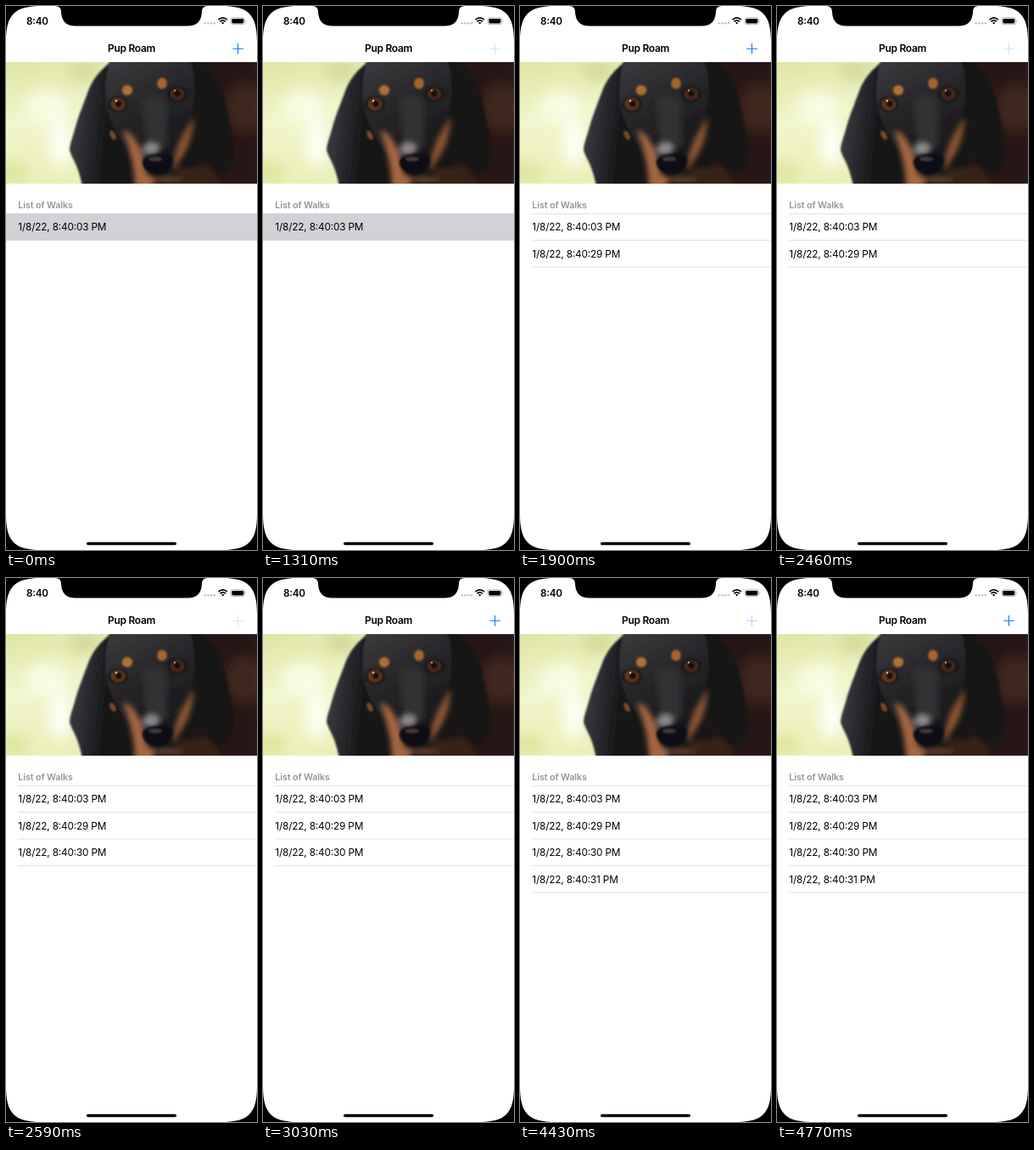
These frames come from a looping animation (296 px wide and 640 px high, 4830 ms). An HTML page:

```html
<!DOCTYPE html>
<html lang="en">
<head>
<meta charset="utf-8">
<title>Walk list</title>
<style>
  html, body { margin: 0; width: 100%; height: 100%; overflow: hidden; background: #fff; }
  svg { display: block; }
  text { font-family: Inter, "Liberation Sans", sans-serif; font-feature-settings: "calt" 1; fill: #000; }
  .clock { font-size: 11.7px; font-weight: 600; letter-spacing: -.25px; }
  .title { font-size: 12px; font-weight: 600; letter-spacing: -.3px; text-anchor: middle; }
  .head { font-size: 10.7px; font-weight: 600; letter-spacing: -.1px; fill: #949498; }
  .row text { font-size: 11.8px; letter-spacing: -.17px; }
  .line { stroke: #e2e2e4; stroke-width: 1; }

  .plus, .picked, .row2, .row3, .row4 { animation: 4830ms step-end infinite; }
  .plus { fill: none; stroke: #007aff; stroke-width: 1.1; animation-name: tap; }
  .picked { animation-name: unpick; }
  .row2 { animation-name: add2; }
  .row3 { animation-name: add3; }
  .row4 { animation-name: add4; }

  /* each tap dims the button at once; it fades back after the row is added */
  @keyframes tap {
    0% { opacity: 1; }
    27.12% { opacity: .2; }
    32.29% { opacity: .32; }
    34.57% { opacity: .6; }
    36.85% { opacity: .87; }
    39.33% { opacity: 1; }
    50.93% { opacity: .2; }
    55.9% { opacity: .32; }
    58.17% { opacity: .6; }
    60.66% { opacity: .9; }
    62.73% { opacity: 1; }
    85.71% { opacity: .2; }
    91.71% { opacity: .32; }
    93.99% { opacity: .6; }
    96.48% { opacity: .87; }
    98.75%, 100% { opacity: 1; }
  }
  @keyframes unpick { 0% { opacity: 1; } 30.02%, 100% { opacity: 0; } }
  @keyframes add2 { 0% { opacity: 0; } 30.02%, 100% { opacity: 1; } }
  @keyframes add3 { 0% { opacity: 0; } 53.62%, 100% { opacity: 1; } }
  @keyframes add4 { 0% { opacity: 0; } 89.44%, 100% { opacity: 1; } }
</style>
</head>
<body>
<svg width="296" height="640" viewBox="0 0 296 640">
  <defs>
    <clipPath id="frame"><path d="M0 66H296V209H0Z"/></clipPath>
    <linearGradient id="meadow" x1="0" y1="0" x2=".35" y2="1">
      <stop offset="0" stop-color="#dfe6a4"/>
      <stop offset=".45" stop-color="#f1f5cc"/>
      <stop offset="1" stop-color="#eaefb6"/>
    </linearGradient>
    <linearGradient id="face" x1="0" y1="0" x2=".4" y2="1">
      <stop offset="0" stop-color="#3d3c40"/>
      <stop offset=".5" stop-color="#262528"/>
      <stop offset="1" stop-color="#171618"/>
    </linearGradient>
    <linearGradient id="ear" x1="0" y1="0" x2="1" y2=".3">
      <stop offset="0" stop-color="#414246"/>
      <stop offset=".5" stop-color="#2b2c30"/>
      <stop offset="1" stop-color="#141416"/>
    </linearGradient>
    <filter id="soft" x="-50%" y="-50%" width="200%" height="200%"><feGaussianBlur stdDeviation="8"/></filter>
    <filter id="mid" x="-50%" y="-50%" width="200%" height="200%"><feGaussianBlur stdDeviation="3"/></filter>
    <filter id="fine" x="-30%" y="-30%" width="160%" height="160%"><feGaussianBlur stdDeviation="1.2"/></filter>
  </defs>

  <rect width="296" height="640" fill="#fff"/>

  <!-- photo -->
  <g clip-path="url(#frame)">
    <rect y="66" width="296" height="143" fill="url(#meadow)"/>
    <g filter="url(#soft)">
      <ellipse cx="92" cy="76" rx="18" ry="12" fill="#d3d99a"/>
      <ellipse cx="48" cy="120" rx="26" ry="20" fill="#f9fbe2"/>
      <ellipse cx="64" cy="162" rx="14" ry="28" fill="#fdfef4"/>
      <ellipse cx="8" cy="196" rx="20" ry="12" fill="#dde59c"/>
      <path d="M205 50H310V225H205Z" fill="#261814"/>
      <ellipse cx="282" cy="120" rx="24" ry="28" fill="#40271f"/>
    </g>
    <g filter="url(#fine)">
      <path d="M216 60C240 68 256 92 262 128C267 155 270 178 262 192C248 200 232 186 222 168Z" fill="#151314"/>
      <path d="M122 64H220C228 90 228 128 222 160L232 212H100L112 130Z" fill="#171618"/>
      <path d="M126 64C112 74 102 86 97 100C91 116 86 128 82 142C79 154 75 162 75 170C78 180 85 186 90 212H118C114 184 128 156 124 120Z" fill="url(#ear)"/>
      <path d="M124 62H216C225 82 224 112 218 132C214 158 206 182 196 194C184 206 166 202 156 186C142 168 126 148 120 124C116 104 116 82 124 62Z" fill="url(#face)"/>
    </g>
    <g filter="url(#mid)">
      <path d="M138 146C150 149 156 162 162 176L166 197L178 204L170 214H152C152 190 146 170 138 146Z" fill="#a36640"/>
      <path d="M221 130C222 148 215 168 206 180L197 194C196 180 202 160 212 146Z" fill="#8a5433"/>
      <path d="M160 108C174 102 186 104 190 114L190 166H166Z" fill="#323135"/>
      <ellipse cx="171" cy="168" rx="10" ry="7" fill="#8b898b"/>
      <path d="M200 192L238 188L258 214H206Z" fill="#382319"/>
      <ellipse cx="190" cy="204" rx="17" ry="4" fill="#64402d"/>
    </g>
    <g filter="url(#fine)">
      <ellipse cx="143" cy="99" rx="6.2" ry="6" fill="#b07030"/>
      <ellipse cx="184" cy="91" rx="5.8" ry="6.6" fill="#a3662e"/>
      <ellipse cx="126" cy="152" rx="3" ry="6" fill="#7a4a2a" transform="rotate(-28 126 152)"/>
      <ellipse cx="132" cy="115.500" rx="11.500" ry="9" fill="#171314"/>
      <ellipse cx="132" cy="115.500" rx="8.500" ry="7.200" fill="#62391e"/>
      <circle cx="133" cy="115" r="4" fill="#160f0d"/>
      <ellipse cx="202" cy="103.500" rx="11.500" ry="9" fill="#171314"/>
      <ellipse cx="202" cy="103.500" rx="8.200" ry="7" fill="#4a2b1d"/>
      <circle cx="202" cy="103" r="4" fill="#160f0d"/>
      <path d="M161 182C164 174 190 171 196 178C199 186 192 196 181 198C170 198 160 192 161 182Z" fill="#111012"/>
      <ellipse cx="176" cy="180" rx="8" ry="2.500" fill="#3c3b3f"/>
    </g>
    <g fill="#cfcac4">
      <circle cx="130" cy="111.500" r="1.200"/>
      <circle cx="199" cy="99.500" r="1"/>
    </g>
  </g>

  <!-- status bar -->
  <text class="clock" x="24" y="21.800">8:40</text>
  <g fill="#c4c4c7">
    <circle cx="234.700" cy="20.300" r="1.300"/>
    <circle cx="238.400" cy="20.300" r="1.300"/>
    <circle cx="242.100" cy="20.300" r="1.300"/>
    <circle cx="245.800" cy="20.300" r="1.300"/>
  </g>
  <g fill="none" stroke="#000" stroke-width="1.700">
    <path d="M250.500 16.200Q255.700 11.600 260.900 16.200"/>
    <path d="M252.400 18.300Q255.700 15.300 259 18.300"/>
    <path d="M254 19.700Q255.700 18.400 257.400 19.700L255.700 21.400Z" fill="#000" stroke="none"/>
  </g>
  <rect x="265" y="13.700" width="16.600" height="8" rx="2.400" fill="none" stroke="#a4a4a6" stroke-width=".8"/>
  <rect x="266.300" y="15" width="14" height="5.400" rx="1.300"/>
  <path d="M282.700 16.200Q284.300 17.700 282.700 19.200Z" fill="#a4a4a6"/>

  <!-- navigation bar -->
  <text class="title" x="148" y="54.400">Pup Roam</text>
  <path class="plus" d="M267.300 50.300H280M273.500 44V56.500"/>

  <!-- list -->
  <text class="head" x="14.300" y="238.300">List of Walks</text>
  <path class="line" d="M14 244.500H296"/>
  <g class="row">
    <path class="line" d="M14 275.500H296"/>
    <rect class="picked" y="244" width="296" height="32" fill="#d1d1d6"/>
    <text x="14.300" y="264.300">1/8/22, 8:40:03 PM</text>
  </g>
  <g class="row row2">
    <path class="line" d="M14 307H296"/>
    <text x="14.300" y="295.800">1/8/22, 8:40:29 PM</text>
  </g>
  <g class="row row3">
    <path class="line" d="M14 338.500H296"/>
    <text x="14.300" y="327.300">1/8/22, 8:40:30 PM</text>
  </g>
  <g class="row row4">
    <path class="line" d="M14 370H296"/>
    <text x="14.300" y="358.700">1/8/22, 8:40:31 PM</text>
  </g>

  <!-- phone edge, notch and home bar -->
  <path d="M0 0H42C10 0 0 10 0 42ZM296 0V42C296 10 286 0 254 0ZM0 640V598C0 630 10 640 42 640ZM296 640H254C286 640 296 630 296 598Z"/>
  <path d="M58 0C63 0 65 3 65 7C65.500 18 71 23.500 82 23.500H214C225 23.500 230.500 18 231 7C231 3 233 0 238 0Z"/>
  <rect x="95" y="630.700" width="106" height="3.500" rx="1.750"/>
</svg>
</body>
</html>
```
